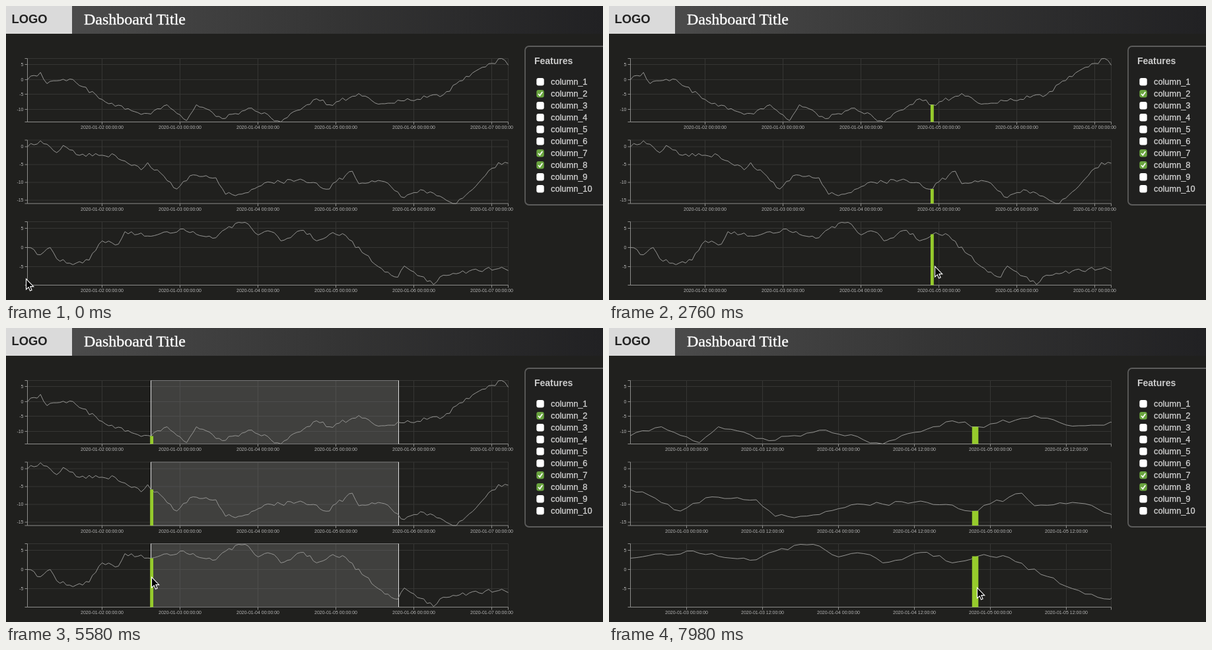
Animation of 904 by 445 pixels, one loop 8 s. Source, as an HTML page:

```html
<!DOCTYPE html>
<html lang="en">
<head>
<meta charset="utf-8">
<title>Dashboard</title>
<style>
  html, body { margin: 0; width: 100%; height: 100%; overflow: hidden; background: #20201e; }
  svg { display: block; }
  text { font-family: "Liberation Sans", Arial, sans-serif; }
  .title { font: 24px "Liberation Serif", Times, serif; fill: #fff; stroke: #fff; stroke-width: .35; }
  .logo { font-weight: bold; font-size: 18.4px; fill: #222; }
  .heading { font-weight: bold; font-size: 14px; fill: #ccc; }
  .option { font-size: 12.8px; fill: #d4d4d4; stroke: #d4d4d4; stroke-width: .3; }
  .chart text { font-size: 7px; fill: #b4b4b4; }
  .chart path { fill: none; }
  .grid { stroke: #353533; }
  .axis { stroke: #8c8c8a; }
  .series { stroke: #949492; stroke-linejoin: round; }
  .bar { fill: #96cb2c; }
  .brush rect { fill: #777; fill-opacity: .36; stroke: #777; }
  .brush path { stroke: #dedede; }
</style>
</head>
<body>
<svg id="stage" width="904" height="445" viewBox="0 0 904 445">
  <defs>
    <linearGradient id="shade">
      <stop offset="0" stop-color="#4b4b4b"/>
      <stop offset=".5" stop-color="#343434"/>
      <stop offset="1" stop-color="#212123"/>
    </linearGradient>
    <clipPath id="plot"><rect x="33" y="-1" width="728.5" height="98"/></clipPath>
  </defs>
  <rect x="100" width="804" height="42" fill="url(#shade)"/>
  <rect width="100" height="42" fill="#dadada"/>
  <text class="logo" x="8.5" y="26">LOGO</text>
  <text class="title" x="118" y="28">Dashboard Title</text>
  <rect x="786" y="61" width="140" height="240" rx="6" fill="#20201f" stroke="#5c5c5b" stroke-width="1.8"/>
  <text class="heading" x="800" y="88">Features</text>
  <g id="options"></g>
  <svg id="charts" width="782" height="445"></svg>
  <path id="cursor" d="M0 0V16L3.7 12.6L6 18L8.6 17L6.3 11.6H11.2Z" fill="#000" stroke="#fff" stroke-width="1.1"/>
</svg>
<script>
const LEFT = 33, WIDTH = 728, HEIGHT = 96, HOURS = 148, LOOP = 8000, STEP = 60;
const ZOOM_START = 5935, ZOOM_TIME = 750, BRUSH_START = 4300, BRUSH_RIGHT = 595;

// Knots are [hour, depth below the chart's top]; a seeded wobble fills in between
const chartSpecs = [
  {
    zero: 31.5, unit: 4.5, values: [5, 0, -5, -10],
    knots: [[0, 32], [4, 21], [6, 38], [13, 31], [23, 62], [34, 82], [38, 84], [43, 70], [46, 83], [49, 94],
      [52, 70], [60, 91], [69, 75], [75, 90], [78, 96], [86, 70], [89, 61], [93, 70], [102, 53], [108, 69],
      [128, 55], [135, 27], [146, 0], [148, 10]]
  },
  {
    zero: 10.3, unit: 5.4, values: [0, -5, -10, -15],
    knots: [[0, 10], [4, 1], [9, 19], [11, 8], [16, 23], [27, 23], [35, 45], [37, 34], [46, 74], [50, 54],
      [58, 57], [61, 82], [65, 82], [75, 64], [85, 61], [93, 74], [95, 63], [100, 47], [102, 66], [110, 63],
      [116, 87], [121, 75], [132, 96], [145, 34], [148, 35]]
  },
  {
    zero: 38.8, unit: 5.75, values: [5, 0, -5],
    knots: [[0, 39], [4, 50], [7, 39], [9, 56], [14, 65], [19, 58], [23, 29], [28, 34], [30, 15], [38, 22],
      [48, 11], [57, 25], [65, 1], [67, 1], [71, 20], [75, 15], [78, 29], [85, 13], [89, 29], [93, 19],
      [97, 18], [108, 68], [114, 84], [116, 67], [125, 95], [128, 81], [146, 69], [148, 74]]
  }
];

// Time, x, y of the pointer
const pointerPath = [
  [0, 30, 413], [1800, 264, 401], [2760, 493, 394], [3500, 660, 382], [4260, 594, 366], [4380, 594, 365],
  [5040, 382, 361], [5520, 220, 377], [6720, 220, 377], [7080, 239, 382], [7560, 354, 386], [7980, 557, 393]
];

// Hours count from 01:00 on the first day; from and to are opacities before and after the zoom
const tickGroup = (first, from, to) => [0, 24, 48].map(gap => ({ hour: first + gap, from, to }));
const ticks = [
  { hour: 23, from: 1, to: 0 }, { hour: 143, from: 1, to: 0 }, { hour: 119, from: 1, to: 0 },
  ...tickGroup(47, 1, 1), ...tickGroup(59, 0, 1)
];

const $ = id => document.getElementById(id);
const mix = (a, b, k) => a + (b - a) * k;
const clamp = (n, low, high) => Math.max(low, Math.min(high, n));
const pad = n => String(n).padStart(2, "0");
const tickLabel = hour => `2020-01-${pad(Math.floor((hour + 1) / 24) + 1)} ${pad((hour + 1) % 24)}:00:00`;
const hourX = (hour, zoom) => mix(LEFT + hour * WIDTH / HOURS, LEFT + (hour - 38.1) * 9.575, zoom);
const cubicInOut = k => k < .5 ? 4 * k ** 3 : 1 - 4 * (1 - k) ** 3;

function seededRandom(seed) {
  return () => (seed = seed * 16807 % 2147483647) / 2147483647;
}

function hourlyData(knots, seed) {
  const random = seededRandom(seed);
  return Array.from({ length: HOURS + 1 }, (_, hour) => {
    const end = Math.max(1, knots.findIndex(knot => knot[0] >= hour));
    const [h0, y0] = knots[end - 1], [h1, y1] = knots[end];
    const wobble = hour === h0 || hour === h1 ? 0 : (random() - .5) * 6;
    return clamp(mix(y0, y1, (hour - h0) / (h1 - h0)) + wobble, 0, HEIGHT);
  });
}

function optionMarkup(n) {
  const y = 96.7 + n * 18, checked = [2, 7, 8].includes(n);
  return `<rect x="803.3" y="${y - 5.7}" width="11.4" height="11.4" rx="3" fill="${checked ? "#6aa53f" : "#fff"}"/>
    ${checked ? `<path d="M806 ${y + .3}l2.3 2.6l4 -5.6" fill="none" stroke="#fff" stroke-width="1.7"/>` : ""}
    <text class="option" x="825" y="${y + 4.4}">column_${n}</text>`;
}

function chartMarkup({ zero, unit, values }, index) {
  const right = LEFT + WIDTH;
  const rows = values.map(v => {
    const y = Math.round(zero - v * unit);
    return `<path class="grid" d="M${LEFT} ${y}H${right}"/><path class="axis" d="M${LEFT - 4} ${y}H${LEFT}"/>
      <text x="27" y="${y + 2.4}" text-anchor="end">${v}</text>`;
  }).join("");
  const columns = ticks.map(t => `<g class="tick"><path class="grid" d="M0 0V${HEIGHT}"/>
    <path class="axis" d="M0 ${HEIGHT}v4"/>
    <text y="${HEIGHT + 10.5}" text-anchor="middle">${tickLabel(t.hour)}</text></g>`).join("");
  return `<g class="chart" transform="translate(-.5 ${79.5 + index * 123.5})">
    <path class="grid" d="M${LEFT} 0H${right}V${HEIGHT}"/>${rows}${columns}
    <path class="axis" d="M${LEFT - 4} 0h4V${HEIGHT}h-4M${LEFT} ${HEIGHT}H${right}v4"/>
    <g class="brush"><rect y="0" height="${HEIGHT}"/><path/></g>
    <path class="series" clip-path="url(#plot)"/><rect class="bar"/></g>`;
}

$("options").innerHTML = Array.from({ length: 10 }, (_, i) => optionMarkup(i + 1)).join("");
$("charts").innerHTML = chartSpecs.map(chartMarkup).join("");
const charts = [...document.querySelectorAll(".chart")].map((node, i) => ({
  data: hourlyData(chartSpecs[i].knots, 4321 * (i + 1)),
  ticks: [...node.querySelectorAll(".tick")],
  brush: node.querySelector(".brush"),
  series: node.querySelector(".series"),
  bar: node.querySelector(".bar")
}));

function setAttrs(node, attrs) {
  for (const name in attrs) node.setAttribute(name, attrs[name]);
}

// Monotone cubic through the pointer path; axis 1 is x, 2 is y
function pointerAt(time, axis) {
  const path = pointerPath, last = path.length - 2;
  let k = 0;
  while (k < last && time >= path[k + 1][0]) k++;
  const slope = j => {
    const n = clamp(j, 0, last);
    return (path[n + 1][axis] - path[n][axis]) / (path[n + 1][0] - path[n][0]);
  };
  const tangent = j => {
    const a = slope(j - 1), b = slope(j);
    return a * b > 0 ? 2 * a * b / (a + b) : 0;
  };
  const span = path[k + 1][0] - path[k][0];
  const u = clamp((time - path[k][0]) / span, 0, 1), v = 1 - u;
  return path[k][axis] * v * v * (1 + 2 * u) + path[k + 1][axis] * u * u * (3 - 2 * u)
    + span * u * v * (tangent(k) * v - tangent(k + 1) * u);
}

function hoverBand(x, zoomed) {
  const first = zoomed ? 39 : 0, width = WIDTH / (zoomed ? 76 : HOURS + 1);
  const band = Math.floor((x - LEFT) / width);
  return { hour: first + band, x: LEFT + band * width, width, visible: band >= 0 };
}

function draw(time) {
  const zoomed = time >= ZOOM_START;
  const zoom = cubicInOut(clamp((time - ZOOM_START) / ZOOM_TIME, 0, 1));
  const lag = time < BRUSH_START ? 15 : zoomed ? 0 : 60;
  const hoverX = pointerAt(time - lag, 1);
  const band = hoverBand(hoverX, zoomed);
  const brushX = Math.round(hoverX);
  const brushing = time > BRUSH_START && !zoomed && brushX < BRUSH_RIGHT - 1;

  for (const { data, ticks: nodes, brush, series, bar } of charts) {
    series.setAttribute("d", "M" + data.map((y, hour) => hourX(hour, zoom).toFixed(2) + " " + y.toFixed(1)).join("L"));
    nodes.forEach((node, i) => {
      const { hour, from, to } = ticks[i];
      const x = hourX(hour, zoom);
      setAttrs(node, { transform: `translate(${zoom % 1 ? x : Math.round(x)} 0)`, opacity: mix(from, to, zoom) });
    });
    const depth = data[band.hour] ?? 0;
    setAttrs(bar, {
      x: band.x, width: band.width, y: depth, height: HEIGHT - depth,
      visibility: band.visible ? "visible" : "hidden"
    });
    brush.setAttribute("visibility", brushing ? "visible" : "hidden");
    if (brushing) {
      setAttrs(brush.firstChild, { x: brushX, width: BRUSH_RIGHT - brushX });
      brush.lastChild.setAttribute("d", `M${brushX} 0V${HEIGHT}M${BRUSH_RIGHT} 0V${HEIGHT}`);
    }
  }
  $("cursor").setAttribute("transform", `translate(${pointerAt(time, 1) + .5} ${pointerAt(time, 2)})`);
}

const begin = performance.now();
function frame() {
  const time = (performance.now() - begin) % LOOP;
  draw(Math.floor(time / STEP) * STEP);
  requestAnimationFrame(frame);
}
frame();
</script>
</body>
</html>
```
